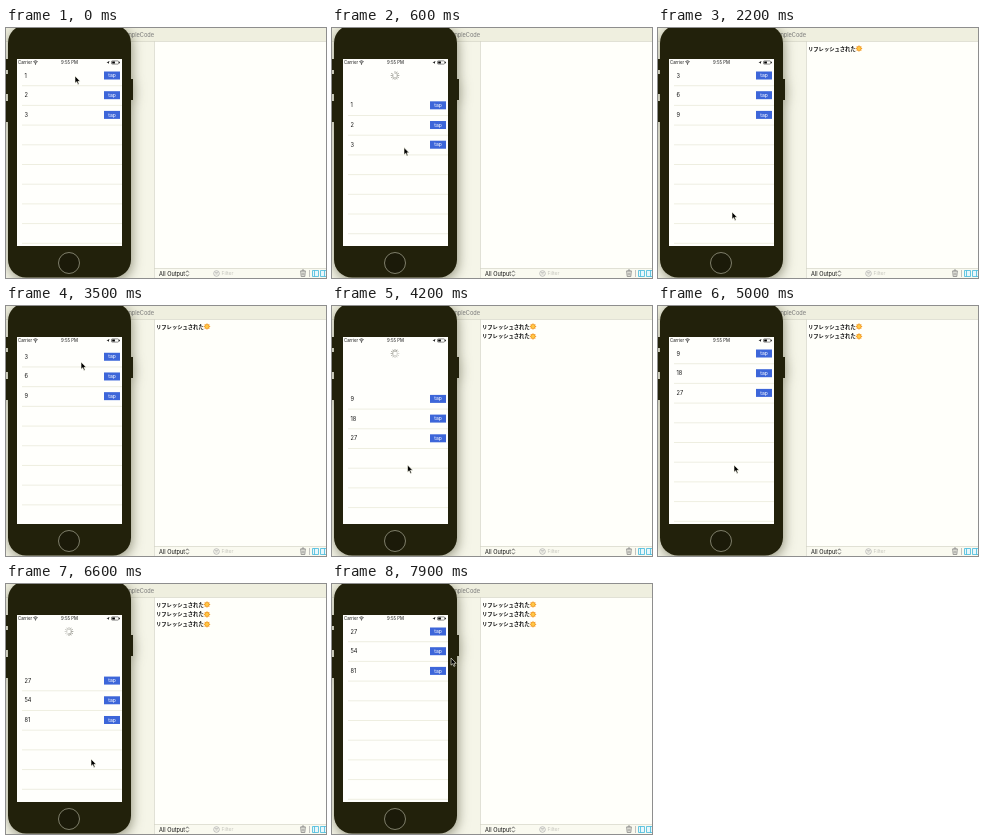
An HTML page for the animation above (8 s loop, 320 by 250 pixels).

```html
<!DOCTYPE html>
<html lang="ja">
<head>
<meta charset="utf-8">
<style>
html, body { margin: 0; width: 100%; height: 100%; overflow: hidden; background: #fffffa; }
svg { display: block; width: 320px; height: 250px; }
text { font-family: Inter, "Liberation Sans", sans-serif; font-size: 5.6px; fill: #111; }
.log text { font: bold 5.3px "Noto Sans CJK JP", "Noto Sans CJK", sans-serif; }
.tap { fill: #fff; font-size: 5px; text-anchor: middle; }
.status text { font-size: 4.3px; }
.phone { filter: drop-shadow(1px 3px 6px rgba(50, 50, 20, .5)); }
</style>
</head>
<body>
<svg viewBox="0 0 320 250">
  <defs>
    <clipPath id="screen"><rect x="11" y="31" width="105" height="187"/></clipPath>
    <g id="sun">
      <path id="rays" fill="#f39a25"/>
      <circle r="1.7" fill="#ffc846"/>
    </g>
  </defs>

  <!-- Editor window -->
  <rect width="148" height="250" fill="#f5f5e8"/>
  <rect x="148.5" y="13" width="172" height="227" fill="#fffffa"/>
  <rect width="320" height="13" fill="#efefdf"/>
  <path d="M0 13.5H320M148.5 13V250M148 240.5H320" stroke="#d5d5c6" stroke-width=".7"/>
  <rect x="149" y="241" width="171" height="9" fill="#fafaf0"/>
  <text x="148" y="9" text-anchor="end" style="fill:#777">SampleCode</text>
  <text x="153" y="247.5">All Output</text>
  <path d="M180 244.5l1.4-1.7 1.4 1.7M180 246.5l1.4 1.7 1.4-1.7" fill="none" stroke="#333" stroke-width=".7"/>
  <g fill="none" stroke="#aaa" stroke-width=".7">
    <circle cx="210.5" cy="245.5" r="2.8"/>
    <path d="M209 244.7h3M209.5 246h2M303.5 242v7"/>
    <path d="M294 243.2h6M296 243v-1h2v1M294.7 243.5l.5 5h3.6l.5-5M296.2 244.5v3M297.8 244.5v3" stroke="#777"/>
  </g>
  <text x="215.5" y="247.4" style="fill:#c4c4bc;font-size:5px">Filter</text>
  <g fill="#e8f7fb" stroke="#43b9dc" stroke-width=".8">
    <path d="M306.5 242.5h6v6h-6zM308.5 242.5v6M314.5 242.5h6v6h-6zM318.5 242.5v6"/>
  </g>
  <g class="log" id="log"></g>

  <!-- Phone -->
  <g class="phone" fill="#22210b">
    <path d="M0 31h3v11H0zM0 46h3v20H0zM0 73h3v21H0zM123 51h4v21h-4z"/>
    <rect x="2" y="-3" width="123" height="252.5" rx="18"/>
  </g>
  <circle cx="63" cy="235" r="10.5" fill="#1b1a09" stroke="#8a8a75" stroke-width=".9"/>
  <rect x="11" y="31" width="105" height="187" fill="#fffffc"/>
  <g clip-path="url(#screen)">
    <g id="table"></g>
    <g id="spinner" stroke="#77776c" stroke-width=".8" stroke-linecap="round"></g>
  </g>
  <g class="status">
    <text x="12" y="36">Carrier</text>
    <path d="M27.3 33.7q2.2-1.9 4.4 0M28.2 34.8q1.3-1.1 2.6 0" fill="none" stroke="#111" stroke-width=".7"/>
    <circle cx="29.5" cy="35.9" r=".55"/>
    <text x="63.5" y="36" text-anchor="middle">9:55 PM</text>
    <path d="M100.5 34.5l3-1.5-1.2 3-.4-1.3z"/>
    <rect x="105.5" y="32.9" width="7" height="3.2" rx=".6" fill="none" stroke="#222" stroke-width=".5"/>
    <path d="M106.2 33.5h2.7v2h-2.7zM113.2 33.8h.8v1.4h-.8z"/>
  </g>

  <path id="cursor" d="M0 0V7.2L1.7 5.7 2.9 8.4 4.1 7.9 2.9 5.3H5.2Z" stroke="#fffff0" stroke-width=".6"/>
</svg>
<script>
const LOOP = 8000, STEP = 100, ROW = 19.7, HEIGHT = 187;
const $ = id => document.getElementById(id);

// Pointer stops: time, x, y
const stops = [
  [0, 69, 48], [200, 70, 55], [1000, 74, 184], [2600, 74, 184],
  [3300, 75, 50], [3400, 75, 50], [4100, 75.5, 159], [5000, 76, 159],
  [5700, 80, 47], [5800, 80, 47], [5900, 80, 54], [6600, 85, 175],
  [7300, 88, 175], [7900, 119, 74], [8000, 119, 74]
];
// Each pull: press time, press height, refresh time, release time
const pulls = [[200, 55, 900, 1500], [3400, 50, 4000, 4400], [5900, 54, 6500, 6900]];
const RETURN = 400;

const clamp = v => Math.max(0, Math.min(1, v));
const ease = v => v * v * (3 - 2 * v);
const rubber = d => HEIGHT * (1 - 1 / (Math.max(0, d) * .55 / HEIGHT + 1));

function pointer(t) {
  const i = stops.findIndex((s, k) => k && t <= s[0]);
  const [t0, x0, y0] = stops[i - 1], [t1, x1, y1] = stops[i];
  const k = ease((t - t0) / (t1 - t0));
  return [x0 + (x1 - x0) * k, y0 + (y1 - y0) * k];
}

function pullOffset(t) {
  for (const [press, y, , release] of pulls) {
    if (t < press || t > release + RETURN) continue;
    const left = 1 - clamp((t - release) / RETURN);
    return rubber(pointer(Math.min(t, release))[1] - y) * left ** 3;
  }
  return 0;
}

// Build repeated parts
$('rays').setAttribute('d', 'M' + Array.from({ length: 16 }, (_, i) => {
  const r = i % 2 ? 2.3 : 3.5, a = i * Math.PI / 8;
  return (r * Math.cos(a)).toFixed(2) + ' ' + (r * Math.sin(a)).toFixed(2);
}).join('L') + 'Z');

$('log').innerHTML = pulls.map((_, i) => {
  const y = 20.5 + i * 9.9;
  return `<g><text x="150" y="${y + 2}">リフレッシュされた</text><use href="#sun" x="201" y="${y}"/></g>`;
}).join('');

let table = '';
for (let i = 0; i < 9; i++) {
  const y = 47.5 + i * ROW;
  table += `<path d="M16 ${y + 10.2}H116" stroke="#e2e2ce" stroke-width=".6"/>`;
  if (i < 3) table += `<text class="num" x="18.5" y="${y + 2}"></text>
    <rect x="98" y="${y - 4}" width="16" height="8" fill="#3d66d9"/>
    <text class="tap" x="106" y="${y + 1.6}">tap</text>`;
}
$('table').innerHTML = table;
const nums = document.querySelectorAll('.num');

$('spinner').innerHTML = Array.from({ length: 12 }, (_, i) =>
  `<path d="M0-2.2V-4" transform="translate(63 47.5) rotate(${i * 30})"/>`).join('');

function draw(t) {
  const [x, y] = pointer(t), offset = pullOffset(t);
  const count = pulls.filter(p => t >= p[2]).length;
  const spinning = pulls.some(p => t >= p[2] && t <= p[3] + RETURN);

  $('cursor').setAttribute('transform', `translate(${x} ${y})`);
  $('table').setAttribute('transform', `translate(0 ${offset})`);
  nums.forEach((n, i) => n.textContent = (i + 1) * 3 ** count);
  [...$('log').children].forEach((line, i) => line.style.display = i < count ? '' : 'none');

  const shown = clamp((offset - 12) / 20);
  [...$('spinner').children].forEach((tick, i) => {
    const phase = (i - Math.floor(t / 83) % 12 + 12) % 12;
    tick.style.opacity = spinning ? shown * (.3 + .6 * phase / 11) : i < shown * 12 ? .7 : 0;
  });
}

function frame(now) {
  draw(Math.floor(now % LOOP / STEP) * STEP);
  requestAnimationFrame(frame);
}
requestAnimationFrame(frame);
</script>
</body>
</html>
```
